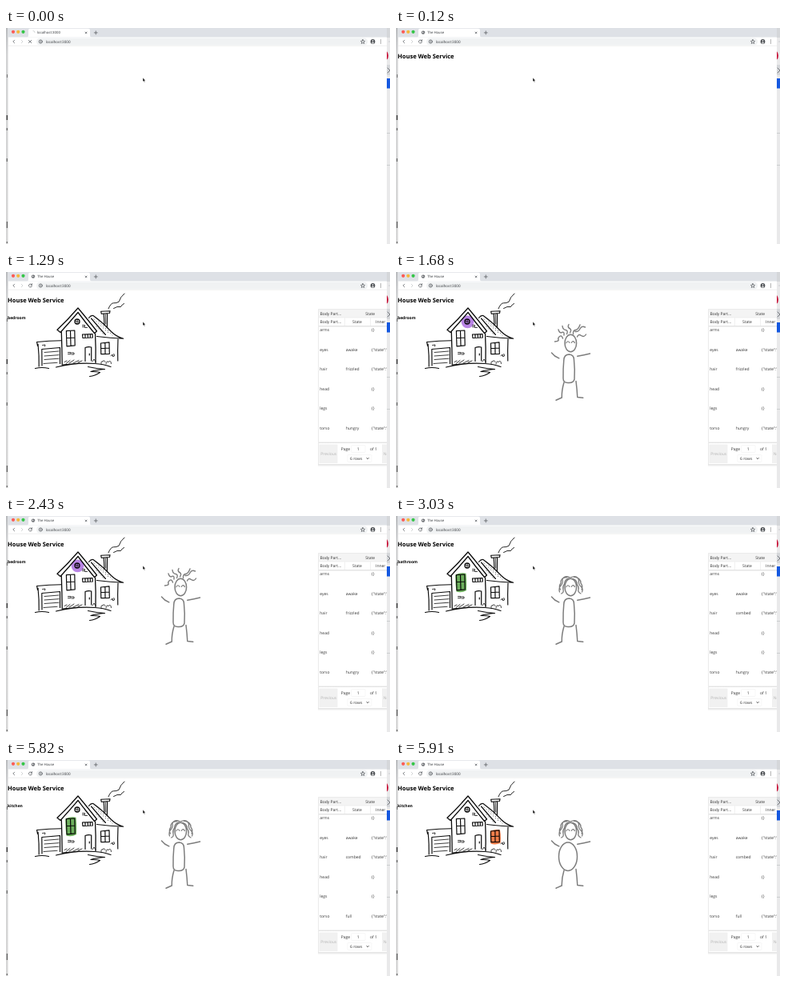
An HTML page for the animation above (8 s loop, 480 by 270 pixels).

```html
<!DOCTYPE html>
<html lang="en">
<head>
<meta charset="utf-8">
<title>The House</title>
<style>
  html, body { margin: 0; width: 100%; height: 100%; overflow: hidden; background: #fff; }
  svg { display: block; width: 100vw; height: 100vh; }
  text { font: 5px "Open Sans", sans-serif; fill: #333; text-rendering: geometricPrecision; white-space: pre; }
  .ui text { font: 4.4px Roboto, sans-serif; fill: #45484c; }
  .ui .url { font-size: 4.7px; }
  .bold { font-weight: 700; fill: #000; }
  .title { font-size: 7.5px; }
  .mid { text-anchor: middle; }
  .dim { fill: #b4b4b4; }
  .ink, .pencil, .icon { fill: none; stroke-linecap: round; stroke-linejoin: round; }
  .ink { stroke: #0c0c0c; stroke-width: 1.15; }
  .fine { stroke-width: .8; }
  .pencil { stroke: #7d7d7d; stroke-width: 1.5; }
  .icon { stroke: #5f6368; stroke-width: .8; }
  .strong { stroke: #333; stroke-width: .9; }
  .faint { stroke: #b8babd; stroke-width: .6; }
  .rule { stroke: #e6e6e6; stroke-width: .6; }
  .glow { mix-blend-mode: multiply; opacity: .93; }
</style>
</head>
<body>
<svg viewBox="0 0 480 270" preserveAspectRatio="none">
  <defs>
    <clipPath id="page"><path d="M1.500 22.200H476V270H1.500Z"/></clipPath>
    <linearGradient id="edge" x2="0" y2="1">
      <stop offset="0" stop-color="#b9bbbe"/><stop offset=".12" stop-color="#d2d3d4"/><stop offset="1" stop-color="#d6d6d6"/>
    </linearGradient>
    <linearGradient id="shade" x2="0" y2="1">
      <stop offset="0" stop-color="#000" stop-opacity=".13"/><stop offset="1" stop-color="#000" stop-opacity="0"/>
    </linearGradient>
  </defs>

  <!-- desktop slivers on both sides of the window -->
  <path fill="url(#edge)" d="M0 0H3V270H0Z"/>
  <path fill="#444" d="M.6 109h1.5v6H.6zM.8 242h1v8h-1z"/>
  <path fill="#777" d="M.6 125h1.6v3H.6zM.6 163h1.4v4H.6zM1 58h1v4H1zM.6 267h1.6v2H.6z"/>
  <path fill="#e9e9ea" d="M476 0H480V270H476Z"/>
  <path fill="#d5d7da" d="M476 0H480V12H476ZM476 46H480V59H476Z"/>
  <path fill="#c9163c" d="M476 29.3Q478 31 478 34.5T476 39.6Z"/>
  <path fill="#1558e0" d="M476 63H480V75.500H476Z"/>
  <path class="icon" d="M477 50L480 53L477 56"/>
  <path class="icon faint" d="M476 131.500H480M476 171.500H480M478.500 17H480"/>

  <!-- browser window -->
  <path fill="#fff" d="M2.500 0H476V270H2.500Z"/>
  <g class="ui">
    <path fill="#dee1e6" d="M2.500 0H476V11.500H2.500Z"/>
    <path fill="#fff" d="M26 11.500Q28 11.500 28 9V3Q28 .8 30 .8H103Q105 .8 105 3V9Q105 11.500 107 11.500Z"/>
    <circle cx="9" cy="4.800" r="2.100" fill="#fc5b57"/>
    <circle cx="15.200" cy="4.800" r="2.100" fill="#f6b83a"/>
    <circle cx="21.500" cy="4.800" r="2.100" fill="#34c648"/>
    <path class="icon" d="M99.200 5L101 6.800M101 5L99.200 6.800M110.300 5.900H114.300M112.300 3.900V7.900"/>
    <path class="rule" d="M3 22.200H476"/>
    <rect x="38" y="12.500" width="414" height="9" rx="4.500" fill="#f0f2f3"/>
    <path class="icon" d="M10.600 15.200L8.800 17L10.600 18.800"/>
    <path class="icon faint" d="M19.200 15.200L21 17L19.200 18.800"/>
    <circle class="icon" cx="43.300" cy="17" r="2.100"/>
    <path class="icon" d="M43.300 16.800V18M43.300 15.900V16"/>
    <text class="url" x="49.800" y="18.700">localhost:3000</text>
    <path class="icon" d="M446 14.500L446.800 16.200L448.600 16.400L447.300 17.600L447.700 19.400L446 18.500L444.300 19.400L444.700 17.600L443.400 16.400L445.200 16.200Z"/>
    <circle cx="458.500" cy="17" r="2.900" fill="#4b4e52"/>
    <circle cx="458.500" cy="16.100" r=".95" fill="#fff"/>
    <path fill="#fff" d="M456.800 18.700Q458.500 16.900 460.200 18.700Q458.500 20.100 456.800 18.700Z"/>
    <path class="icon strong" d="M468.500 15V15M468.500 17V17M468.500 19V19"/>
    <g data-on="0 60">
      <text x="39" y="7.400">localhost:3000</text>
      <path class="icon faint" d="M36 5.500A2 2 0 0 0 34 3.500"/>
      <path class="icon" d="M28.400 15.300L31.800 18.700M31.800 15.300L28.400 18.700"/>
    </g>
    <g data-on="60">
      <text x="39" y="7.400">The House</text>
      <circle cx="34" cy="5.600" r="2.200" fill="#5c6064"/>
      <path fill="#fff" d="M32.400 5Q33.500 3.800 34.200 5T33.500 6.600ZM34.800 6L35.700 5.300L35.300 7Z"/>
      <path class="icon" d="M31.900 15.600A2 2 0 1 0 32.400 17.400M32.500 14.700V16.200H31"/>
    </g>
  </g>

  <g clip-path="url(#page)">
    <text class="bold title" x="2.100" y="37.600" data-on="120">House Web Service</text>
    <text class="bold" x="2" y="58.700" data-on="1290 2880">bedroom</text>
    <text class="bold" x="2" y="58.700" data-on="2880 5820">bathroom</text>
    <text class="bold" x="2" y="58.700" data-on="5820">kitchen</text>

    <g id="house" data-on="150">
      <g class="ink">
        <!-- main gable and walls -->
        <path d="M64 72.300Q77 60 90 45Q101 58 113.500 74L110.500 76.500Q100 64 90 50.500Q78.500 64 68 75.500L64 72.300" stroke-width="1.300"/>
        <path d="M69.300 75Q70 95 70.200 116M111.500 77Q112.500 95 112 114" stroke-width="1.300"/>
        <circle cx="89" cy="62" r="3" stroke-width="1.300"/>
        <path class="fine" d="M87 61.500L91 62.400M89.300 59.600L88.700 64.600"/>
        <path d="M75.400 73.600L85.800 73L86.200 91.800L76 92.800ZM80.500 73.500L81 92M76.500 82.500L86 82" stroke-width="1.200"/>
        <path d="M95.500 78L108 77.500L108.300 82L96 82.500ZM99 78V82M102.300 78V82M105.300 78V82" stroke-width="1.200"/>
        <path class="fine" d="M95.500 66.500H98.500V68.500H95.500M98.500 69.500H101.500M77.500 100.500H81V102.500H77.500M82 101H85V103H82"/>
        <path d="M99 111.500V94.500Q103 93 106.700 94V111M104.300 102V104" stroke-width="1.200"/>
        <!-- right wing, roof and chimney -->
        <path d="M103.500 57.500Q106 54 109 54.500Q121 63 131.500 74.500Q138 81 146.800 83.200Q130 82.500 113.500 80.500M106.500 58L116 69L124.500 78.500"/>
        <path class="fine" stroke-dasharray=".3 3.700" d="M110 59L129 77M113 68L123 79M116 62L133 79"/>
        <path d="M118.700 49.300L130 48.700L129.500 51.500L119.300 52.300ZM122.300 52.500L123 66M126.600 52L126.400 69"/>
        <path class="fine" d="M124.500 53L124.700 65"/>
        <path d="M140 84Q139.400 98 139.800 111"/>
        <path d="M118.500 89L129 87.800L129.300 102.300L118.800 102.600ZM123.900 89L124 102.500M118.800 95.500L129 95" stroke-width="1.200"/>
        <path class="fine" d="M131 104.500L132.500 103.500L133.500 105.500M133.500 103.500Q136 101 135.500 105Q133.500 106.500 133 104.500"/>
        <path class="fine" d="M119 114.500Q118.500 111 121 112Q122.500 109 124 112.500M125 115Q125.500 110.500 128 112.500Q131 109.500 131.500 114.500"/>
        <!-- smoke -->
        <path d="M128 46Q131 38.500 134.500 38.800T141 37.300Q143 31 148 27M134.500 45.500Q139 42.500 143.500 43.500Q145 40.500 147.500 39.500" stroke-width=".9"/>
        <!-- garage -->
        <path d="M38.500 87.500Q54 86 69 85.800M38.500 87.500L39.500 92.500M40 90Q41.500 105 41.200 118M45 117L44.800 96.500L67.500 94.500V114.500"/>
        <path class="fine" d="M45.500 91.500L49 91L48.500 93M48 100.500L66 99M48 105L66 103.700M48 109.500L66 108.200M47 114.500L64 113.300"/>
        <!-- ground and path -->
        <path d="M36.500 120.500Q45 118.500 53.500 120.500M62.500 119Q88 112.500 111 114.500Q122 115 131 118.500M71 116L92 114" stroke-width="1.200"/>
        <path class="fine" d="M73 112.500L76 111M75 114.500L80 110.500M79 114L85 110M84 114L91 110.500M90 113L95 111M108 112L110 109L112 112"/>
        <path d="M102.500 118.500Q114 121 123.500 121.500Q112 122.300 106 124.500Q114 124.500 117.500 125.500Q111 130 104.500 130.500"/>
      </g>
      <circle class="glow" cx="89.500" cy="62.300" r="7.900" fill="#b37be2" data-on="1500 2970"/>
      <path class="glow" fill="#62aa50" data-on="2970 5910" d="M74.300 73.500Q80 70.500 87.500 71.700Q88.500 82 88 93Q82 96.500 75.500 94.500Q74 84 74.300 73.500Z"/>
      <path class="glow" fill="#f4743c" data-on="5910" d="M118 88.500Q124 86 130 87.500Q131.500 96 130.500 104Q124 106.500 118.500 104.500Q117 96 118 88.500Z"/>
    </g>

    <g class="pencil" data-on="1470">
      <ellipse cx="218.300" cy="89" rx="7.300" ry="10.700"/>
      <path d="M212.700 88.800Q214.800 85 217 88.400M219.300 88.400Q221.300 84.800 223.500 88.600" stroke-width="1.100"/>
      <path d="M194.500 101L198.500 105L203.800 107.800M226.800 105.300Q235 103.800 242.500 102"/>
      <path d="M210 138Q207 148 207.300 157L200 160.200M225 136.500Q226.300 147 226.800 156.500L233.800 157.200"/>
      <path data-on="0 5910" d="M209.800 110Q210 103.300 216.500 103Q222.600 103.500 222.500 110Q223.800 122 223 134Q222 138.800 215.500 138.500Q209 138.800 209 133Q208.800 120 209.800 110Z"/>
      <ellipse data-on="5910" cx="215" cy="120.700" rx="11.500" ry="17.700"/>
      <path data-on="0 2970" stroke-width="1.400" d="M208.500 83Q207 78.500 204.500 80.500T203 84.500T198.500 87M210 79Q210.500 74 207.500 75.500T203 72M213.500 77.500Q215.500 73 212 72.500T208 67.500M217.500 76Q220 72 217 70.500T216 65.500M221.500 77.500Q221 73 224.500 72.500T230 66M224 74.500Q228 75 230 71T236.500 69M226.500 81Q228 77 231.500 79.500T237.500 78"/>
      <path data-on="2970" stroke-width="1.300" d="M217.500 77Q211 73.500 208 79Q209 84 206 87T204.500 95M216 78Q211 79 210.500 85Q208 88 209 92T206.500 97M214 76.500Q205.500 76.500 206 84Q203 88 205.500 92M218 77Q226 73 228.500 80Q227.500 85 231 88T232.500 95M220 78.500Q226 79 226.500 86Q229 89 228 92T231 97M222 76Q231 77 231 84Q234 88 232 92"/>
    </g>

    <g data-on="300">
      <path fill="url(#shade)" d="M390 240H476V243.500H390Z"/>
      <path fill="#fff" stroke="#ddd" stroke-width=".6" d="M480 46.500H390.500V240.500H480"/>
      <path fill="#f4f4f4" d="M391 47H476V57H391Z"/>
      <path class="rule" d="M391 57H476M423.500 57.500V67M455.500 57.500V67"/>
      <path fill="url(#shade)" d="M391 67H476V69.500H391Z"/>
      <text x="392.400" y="53.800">Body Part...</text>
      <text class="mid" x="455.200" y="53.800">State</text>
      <text x="392.400" y="63.900">Body Part...</text>
      <text class="mid" x="439" y="63.900">State</text>
      <text x="462" y="63.900">Inner</text>
      <g data-on="0 1290">
        <path class="rule" d="M391 115.500H476M391 189.500H476"/>
        <text class="mid" x="439" y="145.200" style="fill:#888">No rows found</text>
      </g>
      <g data-on="1290">
        <g id="rows"></g>
        <text x="424.700" y="123.300" data-on="0 2880">frizzled</text>
        <text x="424.700" y="123.300" data-on="2880">combed</text>
        <text x="424.700" y="197" data-on="0 5820">hungry</text>
        <text x="424.700" y="197" data-on="5820">full</text>
      </g>
      <path fill="url(#shade)" transform="matrix(1 0 0 -1 0 427.500)" d="M391 213.500H476V216H391Z"/>
      <path fill="#fff" d="M391 214H476V240H391Z"/>
      <path fill="#f1f1f1" d="M391.300 215.500H414.500V239H391.300ZM470 215.500H476V239H470Z"/>
      <text class="mid dim" x="403.300" y="229">Previous</text>
      <text class="dim" x="471.800" y="229">Next</text>
      <text x="418.800" y="223">Page</text>
      <text x="455" y="223">of 1</text>
      <g fill="#fff" stroke="#ececec" stroke-width=".5">
        <rect x="431.500" y="216.500" width="17.500" height="9" rx="1"/>
        <rect x="427" y="228.500" width="30" height="9" rx="1"/>
      </g>
      <text class="mid" x="440.300" y="223">1</text>
      <text x="430" y="235">6 rows</text>
      <path class="icon strong" d="M450.900 232.500L452.100 233.700L453.300 232.500"/>
    </g>
  </g>

  <path fill="#111" stroke="#fff" stroke-width=".4" d="M171 62.300V67L172.100 66.100L172.900 67.800L173.700 67.400L173 65.800H174.400Z"/>
</svg>
<script>
  const LOOP = 8000;
  const rows = [
    ["arms", "", "{}"],
    ["eyes", "awake", '{"state":"awake"}'],
    ["hair", "", '{"state":"combed"}'],
    ["head", "", "{}"],
    ["legs", "", "{}"],
    ["torso", "", '{"state":"full"}']
  ];
  const columns = [392.3, 424.7, 456.8];
  const rowGroup = document.getElementById("rows");
  const house = document.getElementById("house");

  function addText(parent, x, y, content) {
    const node = document.createElementNS("http://www.w3.org/2000/svg", "text");
    node.setAttribute("x", x);
    node.setAttribute("y", y);
    node.textContent = content;
    parent.append(node);
  }

  rows.forEach((cells, i) => {
    const y = 74.1 + i * 24.58;
    cells.forEach((cell, c) => addText(rowGroup, columns[c], y, cell));
  });

  const timed = [...document.querySelectorAll("[data-on]")].map(node => {
    const [from, to = LOOP] = node.dataset.on.split(" ").map(Number);
    return { node, from, to };
  });

  function draw(t) {
    for (const { node, from, to } of timed) {
      node.style.display = t >= from && t < to ? "" : "none";
    }
    // the room name pushes the drawing down
    house.setAttribute("transform", `translate(0 ${t < 1290 ? -20.4 : 0})`);
  }

  const start = performance.now();
  function tick() {
    draw((performance.now() - start) % LOOP);
    requestAnimationFrame(tick);
  }
  tick();
</script>
</body>
</html>
```
